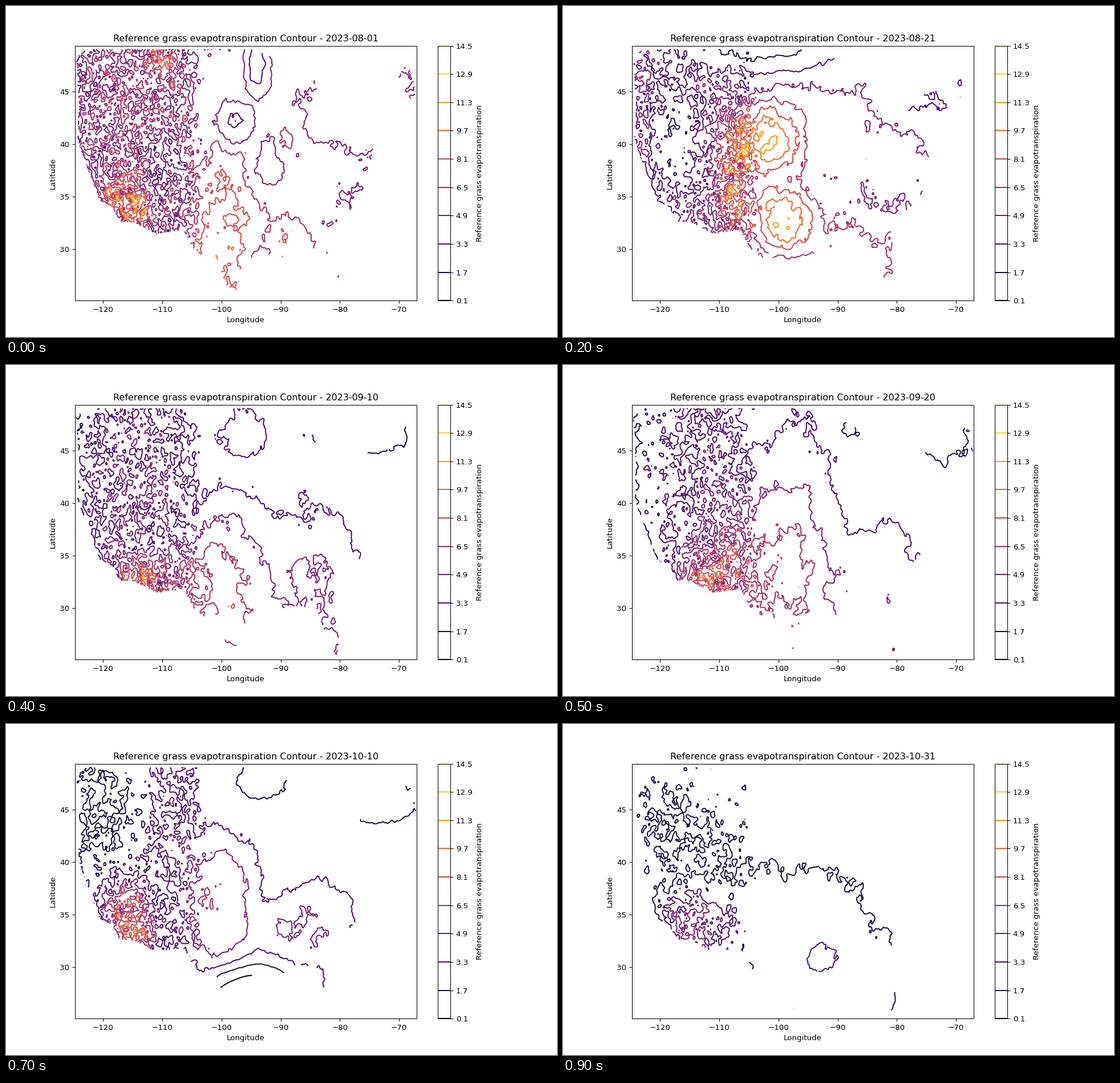
Animation, 966 px wide and 580 px high, one loop 1 s. Source, as a matplotlib script:

```python
import numpy as np
import matplotlib.pyplot as plt
from matplotlib.animation import FuncAnimation
from matplotlib.path import Path

DPI = 96
NAME = "Reference grass evapotranspiration"
LEVELS = np.linspace(0.1, 14.5, 10)
WEST, EAST, SOUTH, NORTH = -124.767, -67.058, 25.067, 49.396

# Land outline, clockwise from the south-west; the first seven points are the west coast.
OUTLINE = np.array([
    (-117.2, 32.6), (-118.5, 34), (-120.6, 34.6), (-122.5, 37.5), (-124.3, 40.3),
    (-124.1, 44), (-124.6, 48.3), (-122.8, 49.1), (-95, 49.1), (-89.5, 48), (-84.5, 46.5),
    (-82.5, 43), (-79, 42.7), (-75, 45), (-71.3, 45.2), (-69.2, 47.4), (-67.8, 47),
    (-67.1, 44.8), (-70.5, 43.2), (-70, 41.6), (-74, 40.6), (-75.6, 35.3), (-81, 32),
    (-80.1, 26.8), (-80.5, 25.2), (-82.8, 28), (-84, 30), (-89.2, 30.2), (-89.5, 29.2),
    (-94, 29.6), (-97.2, 27.8), (-97.4, 26), (-99.2, 26.5), (-101.3, 29.7),
    (-102.8, 29.1), (-104.5, 29.8), (-106.5, 31.8), (-111, 31.4), (-114.8, 32.5)])

LON, LAT = np.meshgrid(np.linspace(WEST, EAST, 470), np.linspace(SOUTH, NORTH, 350))
LAND = Path(OUTLINE).contains_points(np.c_[LON.ravel(), LAT.ravel()]).reshape(LON.shape)
SHORE = np.interp(LAT, *OUTLINE[:7, ::-1].T)
MOUNTAINS = 1 / (1 + np.exp((LON + 104.5) / 0.7))
SEA_BREEZE = 1 - 0.4 * np.exp(-np.maximum(LON - SHORE, 0) / 0.5)

rng = np.random.default_rng(4)


def noise(*sizes):
    """Standard noise with features of the given sizes, longer north to south."""
    fy, fx = (2 * np.pi * np.fft.fftfreq(n) for n in LON.shape)
    k2 = fx ** 2 + 1.8 * fy[:, None] ** 2
    blur = sum(s * np.exp(-0.5 * s * s * k2) for s in sizes)
    field = np.fft.ifft2(np.fft.fft2(rng.normal(size=LON.shape)) * blur).real
    return field / field.std()


def hill(height, lon, lat, width, length):
    """A flat-topped rise, or a hollow if the height is negative."""
    r2 = ((LON - lon) / width) ** 2 + ((LAT - lat) / length) ** 2
    return height * np.exp(-r2 ** 1.5)


TERRAIN = noise(1.2, 2.6)


def roughen(field):
    """Add relief: strong in the mountains, a light wobble in the east."""
    relief = 0.8 * TERRAIN + 0.6 * noise(1.2, 2.6)
    field = field * SEA_BREEZE * (1 + (0.03 + 0.14 * MOUNTAINS) * relief
                                  + 0.05 * noise(6, 12))
    return np.where(LAND, field, np.nan)


aug_01 = (5.5 + hill(3.6, -99.3, 31.5, 5.6, 8.2) + hill(-2.7, -97.5, 42, 3.2, 2)
          + hill(-1.5, -91.5, 38.2, 2.5, 2.5) + hill(-2.7, -94, 47.5, 2.2, 3)
          + hill(1.6, -89.3, 40, 1.6, 2) + hill(-1.9, -77, 43.5, 9, 4)
          + hill(1.8, -88.5, 31.3, 4.8, 2) + hill(3, -116.5, 34.5, 4.5, 3)
          + hill(2.4, -110, 47.8, 3, 1.3) + hill(-1.2, -109.5, 39.5, 3.5, 3))

aug_21 = (5.3 + hill(-4.3, -103, 50.5, 16, 4.2) + hill(-3, -117.5, 40.5, 5.5, 7)
          + hill(5.1, -101.8, 40.6, 5.5, 3.4) + hill(5.1, -99.3, 33, 5.5, 3.2)
          + hill(1.8, -87, 30, 9, 3.2) + hill(-2.2, -75, 45, 10, 3.5)
          + hill(2, -108, 36, 3, 6))

aug_31 = (4.4 + hill(-3, -123, 47.5, 7, 4) + hill(7.8, -116.3, 35.3, 5.5, 4.2)
          + hill(2.9, -101, 38.5, 5.2, 9) + hill(1.3, -100.8, 39.5, 2, 4.5)
          + hill(2.3, -93, 33, 4.5, 3.5) + hill(-3.3, -77, 35.5, 2.2, 3)
          + hill(-1.6, -70, 46, 3.5, 2) + hill(-1.5, -85.5, 45.5, 2, 2)
          + hill(0.8, -86, 37, 7, 3))

sep_10 = (2.7 + hill(1.7, -114, 40, 9, 12) + hill(4, -113, 31.3, 7, 3.2)
          + hill(4.3, -99, 31, 8, 8.3) + hill(2.5, -84, 29, 7, 9)
          + hill(1.1, -96, 46.5, 4.3, 2.4) + hill(-1.3, -97, 42.6, 2, 1)
          + hill(-1.4, -77, 46.5, 12, 2.5))

sep_30 = (2.9 + hill(-1.5, -121, 41, 6.5, 9) + hill(5, -110.5, 34, 5.5, 5.5)
          + hill(4.2, -99, 38, 8.5, 6.5) + hill(2, -98, 30, 8, 5)
          + hill(1, -84, 32, 8, 5) + hill(-1.8, -71, 45, 5.5, 4.5)
          + hill(-1.6, -89, 47, 4, 1.5))

oct_10 = (2.7 + hill(-1.1, -121, 45, 8, 6) + hill(4.8, -115.5, 34, 5, 4)
          + hill(3.5, -100.5, 36, 6.5, 6.5) + hill(2.3, -86, 34, 7, 3.6)
          + hill(-3.8, -96, 27.3, 8, 3) + hill(2.2, -81, 27, 2, 2.5)
          + hill(-1.5, -75, 46, 11, 3) + hill(1.1, -108, 45, 4, 5)
          + hill(-1.4, -93, 48, 5, 2.5))

oct_31 = (1.25 + hill(1.1, -102, 33, 20, 6.8) + hill(2.6, -114.5, 34, 5.5, 3.5)
          + hill(1.4, -91, 30.8, 5, 2) + hill(1.3, -82.5, 28.5, 2.5, 3.2)
          + hill(-1.5, -98, 50.8, 9, 2.6) + hill(0.6, -117, 43.5, 6, 3))

DAYS = {"08-01": aug_01, "08-11": (aug_01 + aug_21) / 2, "08-21": aug_21,
        "08-31": aug_31, "09-10": sep_10, "09-20": (sep_10 + sep_30) / 2,
        "09-30": sep_30, "10-10": oct_10, "10-20": (oct_10 + oct_31) / 2,
        "10-31": oct_31}

fig, ax = plt.subplots(figsize=(966.01 / DPI, 580.01 / DPI), dpi=DPI)
ax.set(xlim=(WEST, EAST), ylim=(SOUTH, NORTH), xlabel="Longitude", ylabel="Latitude")
maps = [ax.contour(LON, LAT, roughen(field), levels=LEVELS, cmap="inferno",
                   vmin=LEVELS[0], vmax=LEVELS[-1]) for field in DAYS.values()]
fig.colorbar(maps[0], ax=ax, label=NAME)


def show(index):
    for k, contours in enumerate(maps):
        contours.set_visible(k == index)
    ax.set_title(f"{NAME} Contour - 2023-{list(DAYS)[index]}")


anim = FuncAnimation(fig, show, frames=len(DAYS), interval=100,
                     init_func=lambda: show(0), repeat=True, repeat_delay=0)
plt.show()
```
